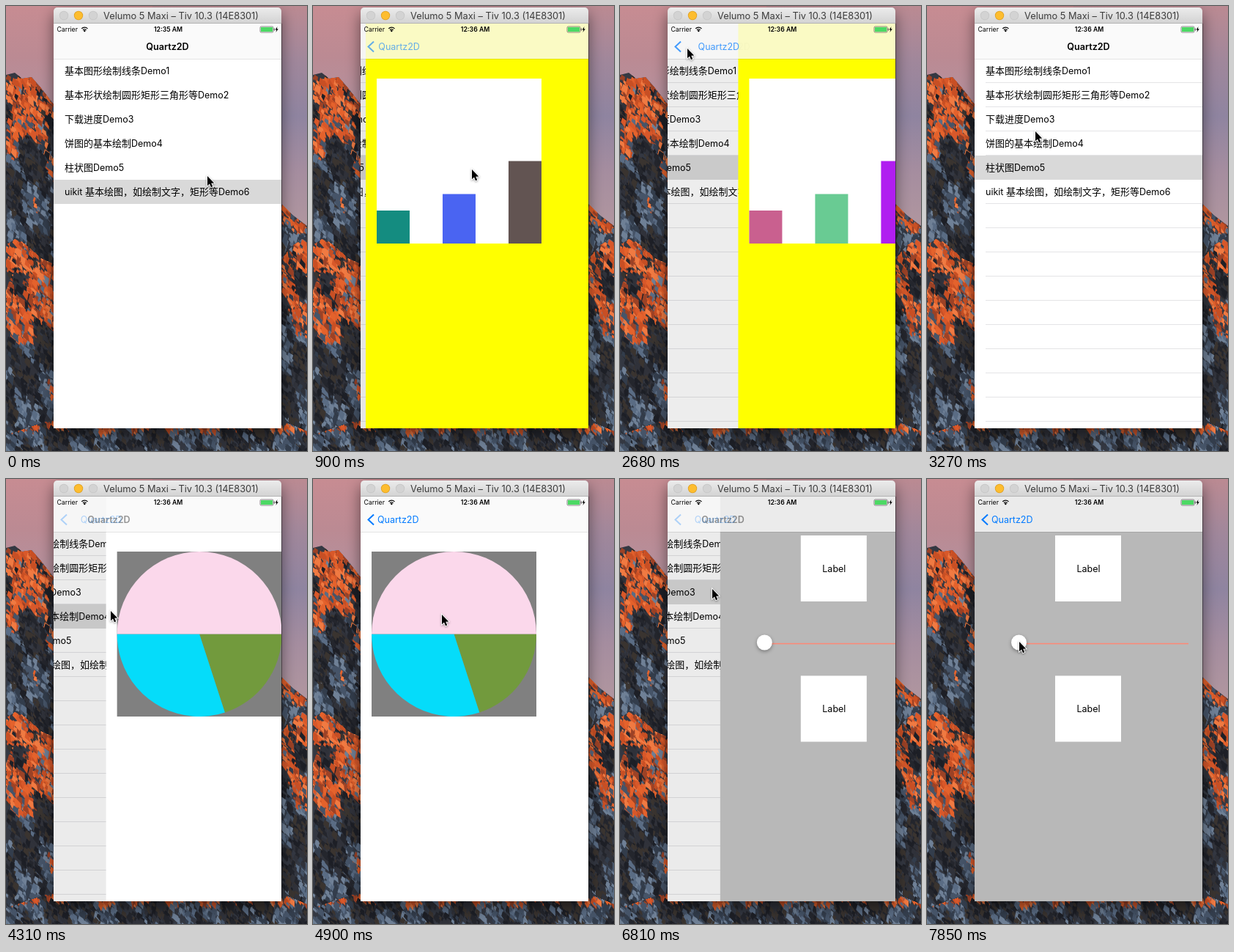
Animation, 411 px wide and 607 px high, one loop 7.99 s. Source, as an HTML page with a canvas:

```html
<!DOCTYPE html>
<html lang="zh">
<head>
<meta charset="utf-8">
<title>Quartz2D</title>
<style>
html, body { margin: 0; width: 100%; height: 100%; overflow: hidden; background: #2a2b31 }
canvas { display: block }
</style>
</head>
<body>
<canvas id="stage" width="411" height="607"></canvas>
<script>
const LOOP = 7990, L = 65, T = 24, W = 311, H = 552, BAR = 72, ROW = 33;
const BLUE = '#007aff';
const LATIN = 'Inter, "Open Sans", sans-serif', HAN = '"Noto Sans CJK SC", "Noto Sans CJK", sans-serif';
const ROWS = ['基本图形绘制线条Demo1', '基本形状绘制圆形矩形三角形等Demo2', '下载进度Demo3',
  '饼图的基本绘制Demo4', '柱状图Demo5', 'uikit 基本绘图，如绘制文字，矩形等Demo6'];
const PARTS = [.2, .3, .5];

// start, page, 1 = push / 0 = pop
const MOVES = [[600, 'bars', 1], [2620, 'bars', 0], [4153, 'pie', 1], [5859, 'pie', 0], [6659, 'slider', 1]];
// the pointer reaches x, y at each time
const STOPS = [[-300, 275, 232], [300, 217, 223], [1350, 191, 200], [2384, 92, 58], [3268, 148, 171], [3563, 163, 207],
  [3858, 143, 180], [4890, 176, 185], [5627, 91, 62], [6069, 126, 122], [6500, 126, 150], [7690, 126, 222]];

const canvas = document.getElementById('stage');
const desktop = new OffscreenCanvas(411, 607);
let c = desktop.getContext('2d');

const clamp = v => Math.max(0, Math.min(1, v));

function rect(x, y, w, h, fill) {
  c.fillStyle = fill;
  c.fillRect(x, y, w, h);
}

function disc(x, y, r, fill) {
  c.fillStyle = fill;
  c.beginPath();
  c.arc(x, y, r, 0, 7);
  c.fill();
}

function poly(points) {
  c.beginPath();
  points.forEach(([x, y]) => c.lineTo(x, y));
  c.closePath();
}

function text(s, x, y, size, fill, align = 'left', weight = 400) {
  c.font = `${weight} ${size}px ${LATIN}`;
  c.fillStyle = fill;
  c.textAlign = align;
  c.fillText(s, x, y);
}

function mixedText(s, x, y) {
  c.textAlign = 'left';
  c.fillStyle = '#000';
  for (const run of s.match(/[ -~]+|[^ -~]+/g)) {
    c.font = /[ -~]/.test(run) ? `12.5px ${LATIN}` : `13px ${HAN}`;
    c.fillText(run, x, y);
    x += c.measureText(run).width;
  }
}

function gradient(y0, y1, tones) {
  const g = c.createLinearGradient(0, y0, 0, y1);
  tones.forEach((tone, i) => g.addColorStop(i / (tones.length - 1), tone));
  return g;
}

// ---- desktop and window frame, painted once ----
let seed = 11;
const rnd = () => (seed = seed * 16807 % 2147483647) / 2147483647;
const pick = list => list[Math.floor(rnd() * list.length)];

const GLOW = ['#e4622c', '#c84f24', '#f07a42', '#d8582a', '#9c4226'];
const SNOW = ['#5a6c84', '#465468', '#6f8096', '#333d4c'];
const DARK = ['#24262d', '#30323a', '#1d1f26', '#3a3430'];

// Slanted streaks below a ridge line: sunlit near the top, snow and rock further down.
function mountain(ridge, bottom, glow) {
  const left = ridge[0][0], right = ridge.at(-1)[0], top = Math.min(...ridge.map(p => p[1]));
  c.save();
  poly([...ridge, [right, bottom], [left, bottom]]);
  c.fillStyle = '#343842';
  c.fill();
  c.clip();
  for (let i = (right - left) * (bottom - top) / 16; i > 0; i--) {
    const x = left + rnd() * (right - left), y = top + rnd() * (bottom - top), size = 2 + rnd() * 5;
    const wave = Math.sin(x * .13 - y * .06) + Math.sin(y * .045 + x * .05);
    const lit = (y - top) / glow - wave * .3 + rnd() * .3 < .9;
    c.fillStyle = pick(lit && rnd() < .82 ? GLOW : wave + rnd() > .6 ? SNOW : DARK);
    poly([[x, y], [x + size, y + size * .7], [x + size * (.4 + rnd()), y + size * 2.4], [x - size * .3, y + size]]);
    c.fill();
  }
  c.restore();
}

function paintDesktop() {
  rect(0, 0, 200, 607, gradient(0, 140, ['#c78c92', '#bb8a93', '#b3929f']));
  rect(200, 0, 211, 607, gradient(0, 300, ['#bb8a92', '#a0879b', '#8f84a0', '#a58d9f', '#b0969f']));
  mountain([[0, 94], [12, 91], [22, 99], [35, 97], [48, 112], [65, 134]], 360, 130);
  mountain([[0, 326], [15, 316], [30, 328], [48, 344], [65, 352]], 607, 150);
  mountain([[376, 270], [390, 284], [411, 300]], 400, 30);
  mountain([[376, 346], [390, 328], [411, 313]], 607, 120);
  mountain([[0, 585], [60, 565], [376, 565], [411, 580]], 607, 9);

  c.save();
  c.shadowColor = 'rgba(0,0,0,.5)';
  c.shadowBlur = 20;
  c.shadowOffsetY = 8;
  c.fillStyle = gradient(2, T, ['#ececec', '#d2d2d2']);
  c.beginPath();
  c.roundRect(L, 2, W, 574, [5, 5, 0, 0]);
  c.fill();
  c.restore();
  rect(L + W, T, 1, H, 'rgba(0,0,0,.4)');
  rect(L, T - 1, W, 1, '#b4b4b4');
  [['#c6c6c6', '#d3d3d3'], ['#dfa023', '#fdbd2f'], ['#c6c6c6', '#d3d3d3']].forEach(([rim, fill], i) => {
    disc(79 + 20 * i, 13, 6.2, rim);
    disc(79 + 20 * i, 13, 5.4, fill);
  });
  text('Velumo 5 Maxi – Tiv 10.3 (14E8301)', 239, 18, 12.8, '#3c3c3c', 'center');
}

// ---- pages, drawn at their resting place ----
function drawList(t) {
  const chosen = t < 600 ? 5 : t < 4153 ? 4 : t < 6659 ? 3 : 2;
  rect(L, T, W, H, '#fff');
  if (t >= 600) for (let y = BAR + ROW - 1; y < 576; y += ROW) rect(80, y, 296, 1, '#e4e4e6');
  rect(L, BAR + ROW * chosen, W, ROW, '#d9d9d9');
  ROWS.forEach((s, i) => mixedText(s, 80, BAR + ROW * i + 21));
}

const PAGES = {
  bars(t) {
    const tones = t < 1650 ? ['#148c80', '#4a64f2', '#625452'] : ['#c9608f', '#69cb93', '#b01ef0'];
    rect(L, T, W, H, '#ff0');
    rect(80, 99, 225, 225, '#fff');
    PARTS.forEach((p, i) => rect(80 + 90 * i, 324 - 225 * p, 45, 225 * p, tones[i]));
  },
  pie(t) {
    const tones = t < 5180 ? ['#729a3d', '#05dcfa', '#fbd8eb'] : ['#5a78b8', '#a17080', '#7acb64'];
    rect(L, T, W, H, '#fff');
    rect(80, 99, 225, 225, '#808080');
    let a = 0;
    PARTS.forEach((p, i) => {
      c.fillStyle = tones[i];
      c.beginPath();
      c.moveTo(192.5, 211.5);
      c.arc(192.5, 211.5, 112.5, a, a += p * 2 * Math.PI);
      c.fill();
    });
  },
  slider() {
    rect(L, T, W, H, '#b8b8b8');
    for (const y of [77, 268.4]) {
      rect(175, y, 90, 90, '#fff');
      text('Label', 220.5, y + 50, 12.5, '#000', 'center');
    }
    rect(118, 223.8, 239, 1.6, '#fa8a78');
    c.save();
    c.shadowColor = 'rgba(0,0,0,.35)';
    c.shadowBlur = 5;
    c.shadowOffsetY = 2;
    disc(125.5, 223, 10.5, '#fff');
    c.restore();
  }
};

function drawStatus(t) {
  text('Carrier', 69.5, 35, 8.7, '#000');
  text(t < 600 ? '12:35 AM' : '12:36 AM', 221.5, 35, 8.7, '#000', 'center', 600);
  c.strokeStyle = '#000';
  c.lineWidth = 1.3;
  for (const r of [3.2, 5.8]) {
    c.beginPath();
    c.arc(107.3, 35, r, -2.36, -.78);
    c.stroke();
  }
  disc(107.3, 34, 1.2, '#000');
  c.strokeStyle = '#555';
  c.lineWidth = .7;
  c.beginPath();
  c.roundRect(347, 28, 18, 8, 1.5);
  c.stroke();
  rect(348, 29, 16, 6, '#4cd964');
  rect(365.6, 30.5, 1.2, 3, '#555');
  poly([[370.5, 28], [367.5, 32.5], [369.4, 32.5], [368.4, 36], [371.8, 31.2], [369.8, 31.2]]);
  c.fillStyle = '#000';
  c.fill();
}

function drawNav(p, back, title) {
  rect(L, T, W, BAR - T, 'rgba(249,249,249,.79)');
  rect(L, BAR, W, 1, 'rgba(0,0,0,.1)');
  c.globalAlpha = title;
  text('Quartz2D', 220.5 - 104 * p, 60, 12.6, '#000', 'center', 600);
  c.globalAlpha = back;
  text('Quartz2D', 88 + 60 * (1 - p), 60, 12.5, BLUE);
  c.strokeStyle = BLUE;
  c.lineWidth = 2;
  c.beginPath();
  c.moveTo(83, 48.5);
  c.lineTo(75.5, 55.5);
  c.lineTo(83, 62.5);
  c.stroke();
  c.globalAlpha = 1;
}

function drawCursor(t) {
  const next = STOPS.findIndex(s => s[0] > t), i = next < 0 ? STOPS.length - 1 : next;
  const [t0, x0, y0] = STOPS[i - 1], [t1, x1, y1] = STOPS[i];
  const f = clamp(1 - (t1 - t) / Math.min(440, (t1 - t0) / 2));
  c.save();
  c.translate(x0 + (x1 - x0) * f, y0 + (y1 - y0) * f);
  poly([[0, 0], [0, 13.2], [3, 10.5], [5, 15.2], [7.2, 14.3], [5.2, 9.7], [9.2, 9.4]]);
  c.shadowColor = 'rgba(0,0,0,.4)';
  c.shadowBlur = 3;
  c.shadowOffsetY = 1;
  c.strokeStyle = '#fff';
  c.lineWidth = 1.8;
  c.stroke();
  c.shadowColor = 'transparent';
  c.fillStyle = '#000';
  c.fill();
  c.restore();
}

function draw(t) {
  c.drawImage(desktop, 0, 0);
  const [start, page, push] = MOVES.findLast(m => m[0] <= t) || [-LOOP, 'bars', 0];
  const s = (t - start) / 1000;
  const rest = (1 + 19 * s) * Math.exp(-19 * s); // critically damped slide
  const p = push ? 1 - rest : rest;
  c.save();
  c.beginPath();
  c.rect(L, T, W, H);
  c.clip();

  c.save();
  c.translate(-.3 * W * p, 0);
  drawList(t);
  c.restore();
  rect(L, T, W, H, `rgba(0,0,0,${.1 * p})`);
  if (p > .001) {
    c.save();
    c.translate(W * (1 - p), 0);
    PAGES[page](t);
    c.restore();
  }
  drawNav(p, push ? clamp(s / .5) : clamp(1 - s / .22), push ? clamp(1 - s / .25) : clamp(s * s * 4));
  drawStatus(t);
  c.restore();
  drawCursor(t);
}

// each picture is held for about 148 ms
function held(t) {
  return t < 2384 ? Math.floor(t / 150) * 150 : 2237 + 147.4 * Math.min(38, Math.floor((t - 2237) / 147.4));
}

paintDesktop();
c = canvas.getContext('2d');
const begin = performance.now();
function tick() {
  draw(held((performance.now() - begin) % LOOP));
  requestAnimationFrame(tick);
}
tick();
</script>
</body>
</html>
```
